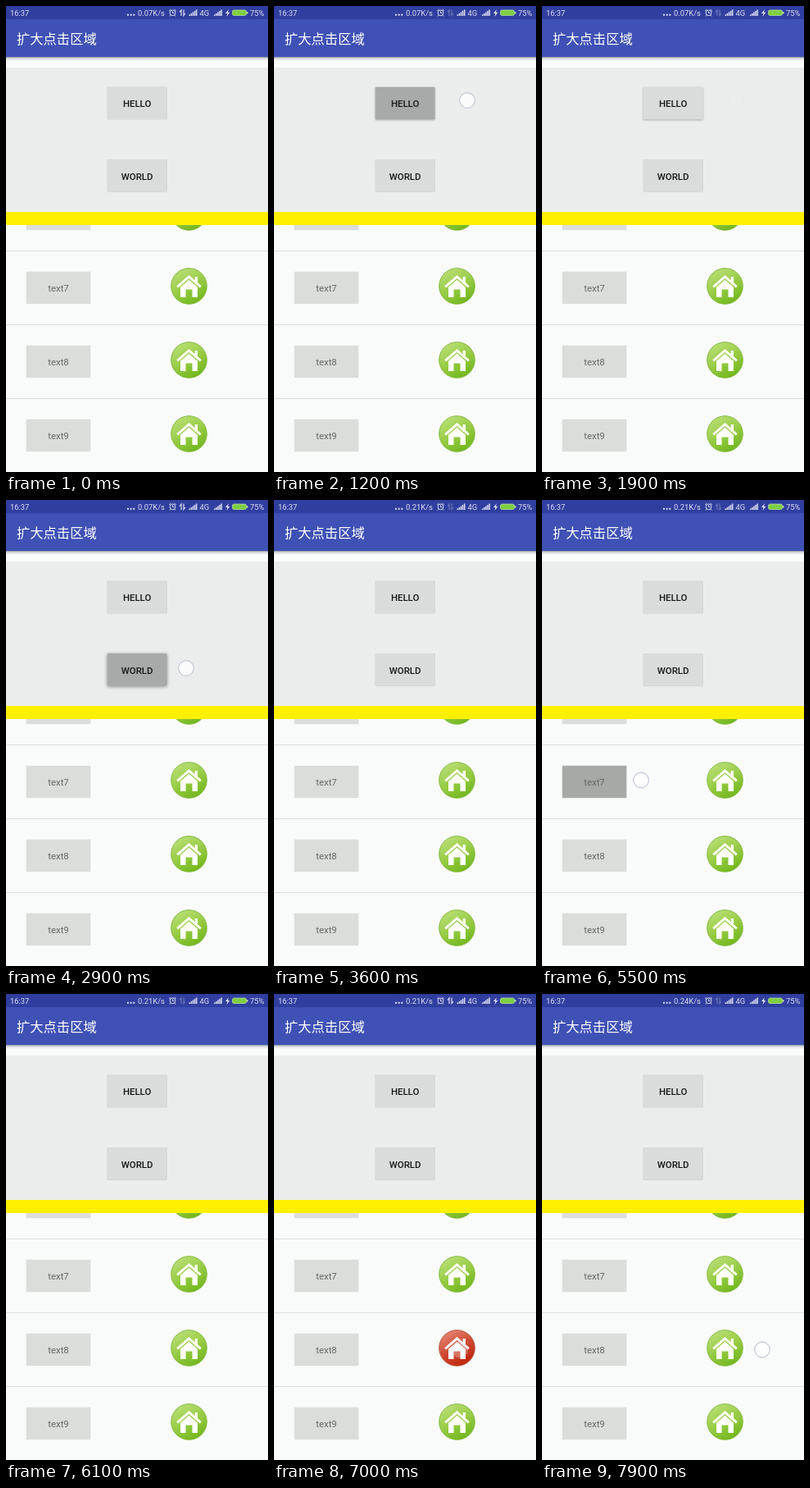
Animation of 320x568 px, one loop 8 s. Source, as an HTML page:

```html
<!DOCTYPE html>
<html lang="zh">
<head>
<meta charset="utf-8">
<style>
html, body { margin: 0; width: 100%; height: 100%; overflow: hidden; background: #f9fbfa; }
svg { display: block; width: 320px; height: 568px; }
text { font: 11.4px Roboto, sans-serif; }
.status text { font-size: 9.4px; fill: #dde0f0; }
.title { font: 16.3px "Noto Sans CJK SC", "Noto Sans CJK", sans-serif; fill: #fff; }
.mid { text-anchor: middle; }
.label { font-weight: 500; fill: #161616; }
.item { fill: #666867; }
</style>
</head>
<body>
<svg id="stage" viewBox="0 0 320 568">
  <defs>
    <linearGradient id="shade" x2="0" y2="1">
      <stop stop-color="#8f949c"/><stop offset=".35" stop-color="#d6d9db"/><stop offset="1" stop-color="#fafbfb"/>
    </linearGradient>
    <linearGradient id="green" x1=".2" x2=".75" y2="1">
      <stop stop-color="#bce07a"/><stop offset=".5" stop-color="#98cc45"/><stop offset="1" stop-color="#6fb51b"/>
    </linearGradient>
    <linearGradient id="red" x1=".2" x2=".75" y2="1">
      <stop stop-color="#e58a78"/><stop offset=".5" stop-color="#d04a32"/><stop offset="1" stop-color="#bd2206"/>
    </linearGradient>
    <g id="house" fill="#fff">
      <path d="M7.2-11.5h3.3v9h-3.3z"/>
      <path d="M-14.3.8L0-11.6 14.3.8" fill="none" stroke="#fff" stroke-width="3"/>
      <path d="M-10.5 1.2L0-7.8 10.5 1.2V13.5H4V4H-4V13.5H-10.5z"/>
    </g>
  </defs>
  <g id="list"></g>
  <rect y="62" width="320" height="13" fill="#fafbfb"/>
  <rect y="75" width="320" height="176" fill="#ebedec"/>
  <rect y="251" width="320" height="16" fill="#ffef00"/>
  <g id="buttons"></g>
  <rect y="62" width="320" height="5" fill="url(#shade)"/>
  <rect y="16" width="320" height="46" fill="#3f51b5"/>
  <text class="title" x="13" y="46">扩大点击区域</text>
  <rect width="320" height="16" fill="#303f9f"/>
  <g class="status" id="status">
    <text x="5" y="12">16:37</text>
    <text x="161" y="12" id="speed"></text>
    <text x="236.5" y="12">4G</text>
    <text x="298" y="12">75%</text>
    <g fill="#dde0f0">
      <path d="M148 9.8h2v2h-2zM151.700 9.8h2v2h-2zM155.300 9.8h2v2h-2z"/>
      <path d="M272 4l-4 5h2.400l-1 4 4-5.200h-2.500z"/>
    </g>
    <g fill="none" stroke="#dde0f0">
      <circle cx="203.500" cy="8.300" r="3.400"/>
      <path d="M203.500 6.300v2.200h1.700M199.300 5.800l2-1.800M207.700 5.800l-2-1.800M201 11.200l-1 1.300M206 11.200l1 1.300"/>
      <path id="sync" d="M214 12V5l-2 2.500M217 4.500v7l2-2.500" stroke-width="1.200"/>
    </g>
    <rect x="276.500" y="5" width="17" height="6.500" rx="2" fill="#7dce40" stroke="#b9dfa5" stroke-width=".8"/>
    <rect x="294" y="7" width="1.500" height="2.600" fill="#b9dfa5"/>
  </g>
  <circle id="dot" r="9.300" fill="#fff" fill-opacity=".75" stroke="#c5c7d6" stroke-width="1.200"/>
</svg>
<script>
const $ = id => document.getElementById(id);
const LOOP = 8000, STEP = 100;

// Dot position, touch down/up, fade steps, highlighted part and its on/off times
const taps = [
  { x: 236, y: 115, down: 1200, up: 1700, fade: 4, part: 'HELLO', on: 1200, off: 1700 },
  { x: 220, y: 205, down: 2600, up: 3000, fade: 3, part: 'WORLD', on: 2600, off: 3000 },
  { x: 277, y: 342, down: 3900, up: 4400, fade: 4, part: 'icon7', on: 4100, off: 4400 },
  { x: 121, y: 341.5, down: 5500, up: 5700, fade: 5, part: 'text7', on: 5500, off: 5700 },
  { x: 227, y: 434, down: 6800, up: 6900, fade: 5, part: 'icon8', on: 6900, off: 7200 },
  { x: 269, y: 433.5, down: 7800, up: 8000, fade: 4 }
];

for (let n = 6; n < 10; n++) {
  const y = 341.5 + (n - 7) * 90;
  $('list').innerHTML += `
    <rect id="text${n}" x="24.700" y="${y - 17.7}" width="78.600" height="39.400"/>
    <text class="mid item" x="64" y="${y + 6.5}">text${n}</text>
    <circle id="icon${n}" cx="223.500" cy="${y}" r="21.800"/>
    <use href="#house" x="223.500" y="${y}"/>
    <rect y="${y + 46.5}" width="320" height="1" fill="#dcdfdd"/>`;
}
['HELLO', 'WORLD'].forEach((name, i) => {
  const y = 98.7 + i * 88.3;
  $('buttons').innerHTML += `
    <rect id="${name}" x="123.700" y="${y}" width="72.800" height="39.500" rx=".8"/>
    <text class="mid label" x="160.100" y="${y + 24.7}">${name}</text>`;
});
for (const x of [223.5, 254])
  for (let i = 0; i < 5; i++)
    $('status').innerHTML += `<rect x="${x + i * 2.1}" y="${10.4 - i * 1.5}" width="1.500" height="${1.6 + i * 1.5}" fill="#dde0f0"/>`;

const clamp = v => Math.max(0, Math.min(1, v));
const within = (t, a, b) => t >= a && t < b;

function paint(t) {
  const tap = taps.find(p => within(t, p.down, p.up + p.fade * STEP));
  const gone = tap && t >= tap.up ? clamp((t - tap.up + STEP) / (tap.fade * STEP)) : 0;
  const dot = $('dot');
  dot.setAttribute('opacity', tap ? (1 - gone) ** 2 : 0);
  if (tap) dot.setAttribute('transform', `translate(${tap.x} ${tap.y})`);

  const lit = id => tap && tap.part === id && within(t, tap.on, tap.off);
  for (const id of ['HELLO', 'WORLD']) {
    const lift = tap && tap.part === id ? clamp((t - tap.down + STEP) / 400) * (1 - gone) : 0;
    $(id).style.fill = lit(id) ? '#a8aaa9' : '#dadcdb';
    $(id).style.filter = `drop-shadow(0 ${0.8 + lift}px ${0.6 + lift * 1.4}px rgba(0,0,0,${0.22 + lift * 0.2}))`;
  }
  for (let n = 6; n < 10; n++) {
    const red = lit('icon' + n);
    $('text' + n).style.fill = lit('text' + n) ? '#a7a9a7' : '#dbdddb';
    $('icon' + n).style.fill = `url(#${red ? 'red' : 'green'})`;
    $('icon' + n).style.stroke = red ? '#b8513d' : '#82b83b';
  }

  $('speed').textContent = t < 3600 ? '0.07K/s' : t < 7600 ? '0.21K/s' : '0.24K/s';
  const busy = [[0, 100], [600, 1200], [2600, 3600], [6600, 7600]].some(([a, b]) => within(t, a, b));
  $('sync').style.opacity = busy ? 1 : 0.35;
}

const start = performance.now();
function tick() {
  const t = (performance.now() - start) % LOOP;
  paint(Math.floor(t / STEP) * STEP);
  requestAnimationFrame(tick);
}
tick();
</script>
</body>
</html>
```
